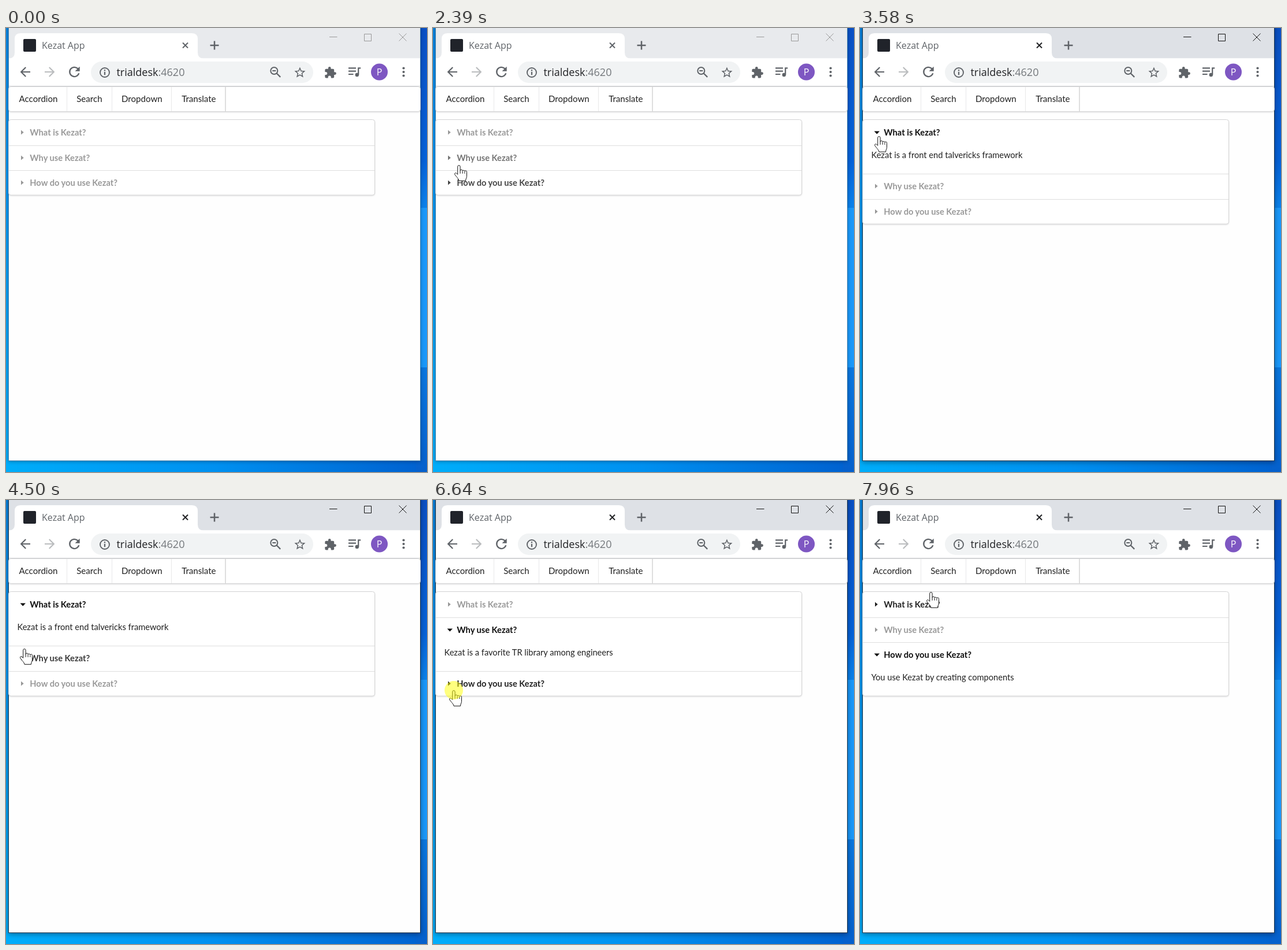
An HTML page for the animation above (8000 ms loop, 729x768 px).

```html
<!DOCTYPE html>
<html lang="en">
<head>
<meta charset="utf-8">
<title>Accordion demo</title>
<style>
  html, body { margin: 0; width: 100%; height: 100%; overflow: hidden; }
  svg { display: block; width: 729px; height: 768px; }
  text { font: 14.65px Lato, sans-serif; }
  .menu text { font-size: 15.1px; }
  .ui { font: 16px "Open Sans", sans-serif; }
  .title { font-weight: 700; }
  .icon { fill: #5f6368; }
  .line { fill: none; stroke: #5f6368; stroke-width: 2.2; }
  .controls { fill: none; stroke: #999; }
  .frame { filter: drop-shadow(0 1px 3px rgba(0, 0, 0, .3)); }
  .strip { fill: #e8eaed; }
  .box { fill: #fff; stroke: #d4d4d5; filter: drop-shadow(0 1px 1px rgba(34, 36, 38, .15)); }
  .rule { stroke: #dedede; }
  .focused .strip { fill: #dee1e6; }
  .focused .controls { stroke: #111; }
  .focused .close { stroke: #202124; }
  .focused .frame { stroke: #20384c; filter: drop-shadow(0 2px 4px rgba(0, 0, 0, .4)); }
  #cursor path { fill: #fff; stroke: #111; stroke-linejoin: round; }
  #click { fill: #ff0; opacity: .5; }
</style>
</head>
<body>
<svg id="stage" viewBox="0 0 729 768">
  <defs>
    <linearGradient id="floor"><stop stop-color="#00adfa"/><stop offset=".5" stop-color="#0090f0"/><stop offset="1" stop-color="#0060cf"/></linearGradient>
    <linearGradient id="side" x2="0" y2="1"><stop stop-color="#0a50c4"/><stop offset=".3" stop-color="#0562d8"/><stop offset=".4" stop-color="#0a80ea"/><stop offset=".75" stop-color="#0a78e0"/><stop offset="1" stop-color="#0560cc"/></linearGradient>
    <linearGradient id="left" x2="0" y2="1"><stop stop-color="#0a86e4"/><stop offset=".4" stop-color="#0098f5"/><stop offset="1" stop-color="#00adfa"/></linearGradient>
  </defs>

  <rect width="729" height="768" fill="url(#floor)"/>
  <rect width="10" height="768" fill="url(#left)"/>
  <rect x="710" width="19" height="768" fill="url(#side)"/>
  <rect x="710" y="311" width="19" height="276" fill="#1a98fa"/>

  <rect class="frame" x="4.5" y="-20" width="713" height="768.5" fill="#fefefe" stroke="#4a86b0"/>
  <rect class="strip" x="5" width="712" height="52.5"/>
  <path d="M5 52.5q10 0 10-10V19q0-10 10-10H322q10 0 10 10V42.5q0 10 10 10H717V100H5z" fill="#fff"/>
  <rect x="30" y="19" width="22" height="22" rx="2" fill="#20232a"/>
  <text class="ui" x="62" y="35.5" fill="#5f6368">Kezat App</text>
  <path class="line close" d="M306 25.5l9 9m0-9l-9 9" style="stroke-width:2"/>
  <path class="line" d="M353.5 30h15M361 22.5v15" style="stroke-width:2.5"/>
  <path class="controls" d="M560 15.5h13.5M620.5 10.5h12v12h-12zM680.5 9.5l13 13m0-13l-13 13"/>

  <path class="line" d="M42 76H26.5m7.7-8l-8 8 8 8"/>
  <path class="line" d="M67 76H82.5m-7.7-8l8 8-8 8" style="stroke:#babcbe"/>
  <path class="icon" transform="translate(104.5 62)scale(1.16)" d="M17.65 6.35A8 8 0 1 0 19.73 14h-2.08A6 6 0 1 1 16.22 7.78L13 11h7V4z"/>
  <rect x="147" y="58" width="385" height="37" rx="18.5" fill="#f1f3f4"/>
  <circle class="line" cx="171" cy="77" r="8" style="stroke-width:1.9"/>
  <path class="line" d="M171 75.8v5.5M171 72v2.2"/>
  <text class="ui" x="191.5" y="83.3" fill="#202124" style="font-size:18px">trialdesk<tspan fill="#74787c">:4620</tspan></text>
  <circle class="line" cx="464.3" cy="74" r="6" style="stroke-width:2"/>
  <path class="line" d="M468.8 78.5l6.4 6.4M461.3 74h6"/>
  <path class="icon" transform="translate(497.5 65.5)scale(.95)" d="M22 9.24l-7.19-.62L12 2 9.19 8.63 2 9.24l5.46 4.73L5.82 21 12 17.27 18.18 21l-1.63-7.03zM12 15.4l-3.76 2.27 1-4.28-3.32-2.88 4.38-.38L12 6.1l1.71 4.04 4.38.38-3.32 2.88 1 4.28z"/>
  <path class="icon" transform="translate(550.5 66)scale(.93)" d="M20.5 11H19V7q0-2-2-2h-4V3.5a2.5 2.5 0 0 0-5 0V5H4Q2 5 2 7v3.8h1.5a2.7 2.7 0 0 1 0 5.4H2V20q0 2 2 2h3.8v-1.5a2.7 2.7 0 0 1 5.4 0V22H17q2 0 2-2v-4h1.5a2.5 2.5 0 0 0 0-5z"/>
  <path class="line" d="M593 69.3h13M593 74.7h13M593 80h8.5M610.2 81V69.3h4"/>
  <circle class="icon" cx="607.8" cy="81" r="3.2"/>
  <circle cx="646.5" cy="76" r="14.5" fill="#7e57c2"/>
  <text class="ui" x="646.5" y="81.6" fill="#fff" text-anchor="middle">P</text>
  <g class="icon"><circle cx="688.5" cy="69.5" r="2.1"/><circle cx="688.5" cy="76" r="2.1"/><circle cx="688.5" cy="82.5" r="2.1"/></g>

  <path d="M5 100.5H717" stroke="#d3d5d8"/>
  <rect class="box" x="4.5" y="101.5" width="713" height="43" rx="4"/>
  <rect id="menuHover" x="5" y="102" width="100" height="42" fill="#f7f7f7"/>
  <path d="M105.5 102v42M183.5 102v42M286.5 102v42" stroke="#e8e8e9"/>
  <path d="M380 102v42" stroke="#d4d4d5" stroke-width="1.5"/>
  <g class="menu" fill="#212121">
    <text x="22.5" y="128.4">Accordion</text><text x="122.2" y="128.4">Search</text>
    <text x="200" y="128.4">Dropdown</text><text x="304.2" y="128.4">Translate</text>
  </g>

  <rect id="panel" class="box" x="4.5" y="158.5" width="634" rx="4"/>
  <g id="rows"></g>
  <text id="content" x="19.5" fill="#212121"></text>

  <g id="cursor">
    <path id="arrow" d="M.5.5V20l4.5-4.3 3.2 7.2 3-1.3-3.1-7h6.2z"/>
    <path id="hand" transform="translate(0 -.7)" d="M-2.3 16V2.5a2.2 2.2 0 0 1 4.4 0V9.5a2 2 0 0 1 4 .5 2 2 0 0 1 3.8.8 1.9 1.9 0 0 1 3.6 1.2V19c0 3-2 4.5-2 8H0c-.6-3.5-3-5-7-10.5-1.5-2.5 1-4 2.7-2.5zM2.1 9.5v5M6.1 10.5v4M9.9 11.5v3"/>
  </g>
  <circle id="click" r="16"/>
</svg>
<script>
const LOOP = 8000, TOP = 159, ROW = 43.5, BODY = 49.5;
const items = [
  ['What is Kezat?', 'Kezat is a front end talvericks framework'],
  ['Why use Kezat?', 'Kezat is a favorite TR library among engineers'],
  ['How do you use Kezat?', 'You use Kezat by creating components'],
];
// Pointer moves: start, end, number of steps, waypoints [step, x, y]
const moves = [
  [320, 600, 4, [[0, 645, 752], [4, 276, 444]]],
  [880, 1640, 9, [[0, 276, 444], [3, 120, 250], [5, 8, 112], [6, 9, 157], [7, 25, 161], [9, 29, 168]]],
  [1740, 2470, 9, [[0, 29, 168], [6, 42, 266], [7, 43, 268], [8, 45, 238], [9, 36, 230]]],
  [2570, 3120, 7, [[0, 36, 230], [7, 33, 188]]],
  [4040, 4680, 8, [[0, 33, 188], [5, 31, 251], [6, 32, 258], [8, 32, 275]]],
  [5620, 5980, 5, [[0, 32, 275], [5, 36, 330]]],
  [7320, 7960, 8, [[0, 36, 330], [5, 84, 222], [7, 115, 172], [8, 123, 160]]],
];
// Clicks: press, time the row opens, x, y
const clicks = [[3320, 3500, 33, 188], [4880, 5160, 32.5, 274.5], [6640, 6860, 36, 329]];

const $ = id => document.getElementById(id);
const show = (el, on) => el.style.display = on ? '' : 'none';
const moveAt = t => moves.findLast(m => m[0] <= t);
const openAt = t => clicks.findLastIndex(c => c[1] <= t);
const rowTop = (i, open) => Math.round(TOP + ROW * i + (open >= 0 && i > open ? BODY : 0));

function pointer(t) {
  const move = moveAt(t);
  if (!move) return [900, 900];
  const [start, end, steps, points] = move;
  const step = Math.min(steps, 1 + (t - start) / (end - start) * (steps - 1));
  const k = Math.max(1, points.findIndex(p => p[0] >= step - 1e-6));
  const [s0, x0, y0] = points[k - 1], [s1, x1, y1] = points[k];
  const f = (step - s0) / (s1 - s0);
  return [x0 + (x1 - x0) * f, y0 + (y1 - y0) * f];
}

function snap(t) {
  const move = moveAt(t);
  if (!move) return t;
  const [start, end, steps] = move;
  const n = Math.min(steps - 1, Math.floor((t - start) / (end - start) * (steps - 1)));
  return start + n * (end - start) / (steps - 1);
}

function isOver(i, [x, y], open) {
  const top = rowTop(i, open);
  return x < 639 && y >= top && y < top + ROW;
}

// Share of the last 100 ms spent over a row gives its colour fade
function hover(i, t, open) {
  let n = 0;
  for (let k = 0; k < 10; k++) n += isOver(i, pointer(t - k * 10), open);
  return n / 10;
}

$('rows').innerHTML = items.map(([title], i) =>
  `<g>${i ? '<path class="rule" d="M5 .5H638"/>' : ''}<g><path/><text class="title" x="41.3" y="27">${title}</text></g></g>`).join('');
const rows = [...$('rows').children];

function draw(t) {
  const open = openAt(t), s = snap(t), [x, y] = pointer(s);
  $('stage').classList.toggle('focused', t >= clicks[0][0]);

  rows.forEach((row, i) => {
    row.setAttribute('transform', `translate(0 ${rowTop(i, open)})`);
    const label = row.lastChild;
    label.setAttribute('opacity', i === open ? .95 : .4 + .47 * hover(i, s, open));
    label.firstChild.setAttribute('d', i === open ? 'M24.5 19.5h9.5l-4.75 5z' : 'M26 17.5l4.7 4-4.7 4z');
  });
  $('panel').setAttribute('height', 3 * ROW + (open < 0 ? 0 : BODY + .5));
  $('content').textContent = open < 0 ? '' : items[open][1];
  $('content').setAttribute('y', rowTop(open, open) + 65.6);

  const inMenu = y > 102 && y < 145 && x < 380;
  // After the last click the pointer keeps its shape until it moves
  const shapeOpen = openAt(t < 7320 ? Math.min(t, 6850) : t);
  const isHand = inMenu || items.some((_, i) => isOver(i, [x, y], shapeOpen));
  show($('menuHover'), inMenu && x < 105);
  show($('hand'), isHand);
  show($('arrow'), !isHand);
  $('cursor').setAttribute('transform', `translate(${x} ${y})`);

  const click = clicks.find(c => t >= c[0] && t < c[1]);
  show($('click'), click);
  if (click) $('click').setAttribute('transform', `translate(${click[2]} ${click[3]})`);
}

function tick() {
  draw(performance.now() % LOOP);
  requestAnimationFrame(tick);
}
tick();
</script>
</body>
</html>
```
